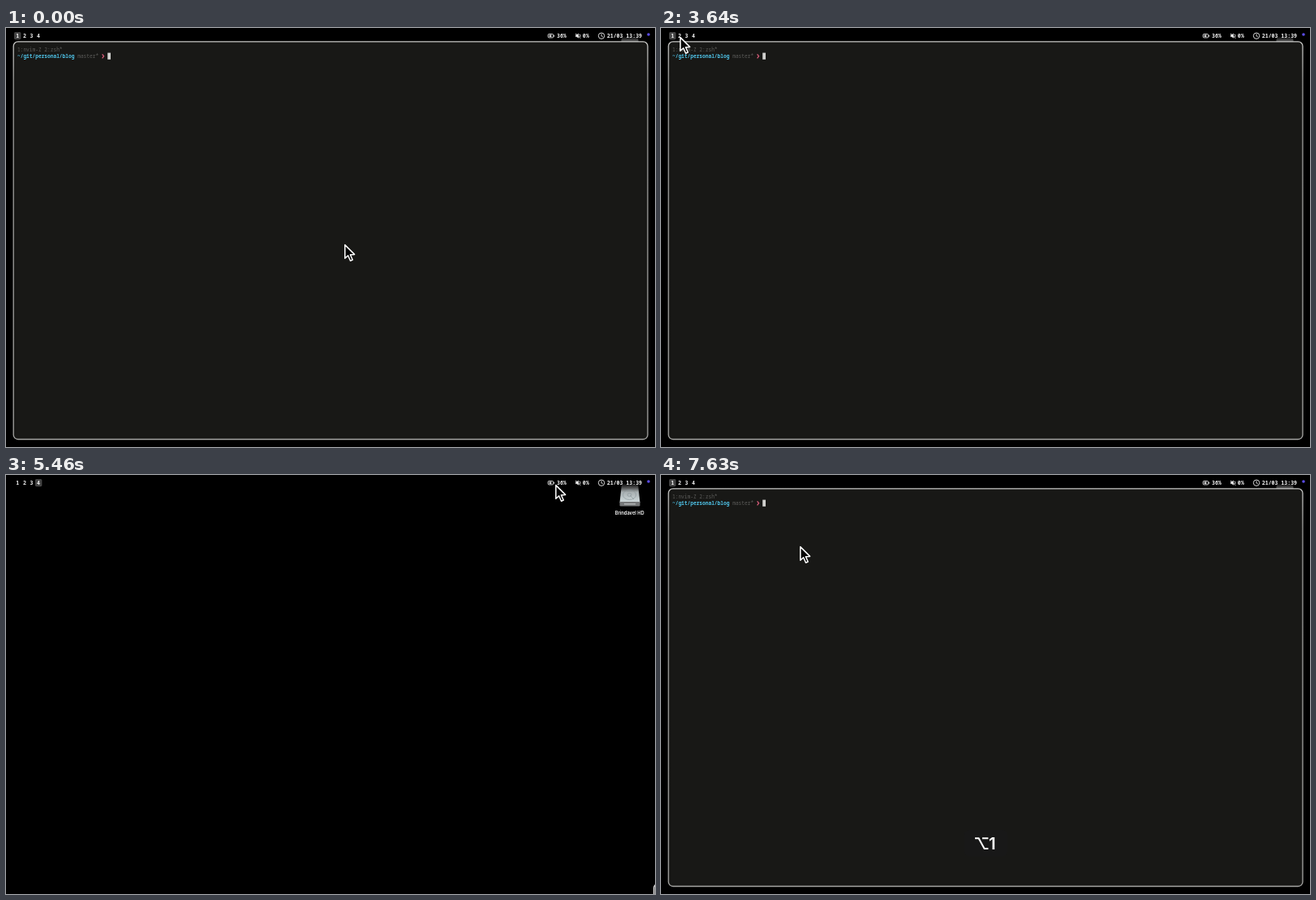
These frames come from a looping animation (800 by 517 pixels, 8000 ms). An HTML page:

```html
<!DOCTYPE html>
<html lang="en">
<head>
<meta charset="utf-8">
<title>Workspace switching</title>
<style>
  html, body { margin: 0; width: 100%; height: 100%; overflow: hidden; background: #000; }
  svg { display: block; width: 800px; height: 517px; }
  text { white-space: pre; }
  .bar { font: 700 6.55px "Noto Sans Mono", "DejaVu Sans Mono", monospace; fill: #f2f2f2; }
  .term { font: 500 6.18px "Noto Sans Mono", "DejaVu Sans Mono", monospace; fill: #5c5c5a; }
  .path { font-weight: 600; fill: #4fc3e8; }
  .label { font: 600 5.75px Inter, sans-serif; fill: #fff; text-anchor: middle; }
  .icon { fill: none; stroke: #eee; stroke-width: .9; }
</style>
</head>
<body>
<svg viewBox="0 0 800 517">
  <defs>
    <linearGradient id="metal" gradientUnits="userSpaceOnUse" x1="0" y1="10" x2="0" y2="35">
      <stop offset="0" stop-color="#000"/>
      <stop offset=".2" stop-color="#444"/>
      <stop offset=".45" stop-color="#a9b0b2"/>
      <stop offset="1" stop-color="#d3dee0"/>
    </linearGradient>
    <linearGradient id="edge" x1="0" y1="0" x2="0" y2="1">
      <stop offset="0" stop-color="#c8c8c6"/>
      <stop offset=".1" stop-color="#9c9c9a"/>
      <stop offset="1" stop-color="#a6a6a4"/>
    </linearGradient>
  </defs>
  <rect width="800" height="517"/>

  <g id="drive">
    <path d="M759 11H779L781.5 34H756.5Z" fill="url(#metal)"/>
    <rect x="756.5" y="33" width="25" height="5.5" rx="1.2" fill="#77797a"/>
    <path d="M762 35.8H776" stroke="#b5b8b9" stroke-width="1.4"/>
    <g fill="none" stroke="#8d999c" stroke-width=".7">
      <ellipse cx="768.5" cy="24.5" rx="8" ry="6"/>
      <ellipse cx="768.5" cy="24.5" rx="2.5" ry="1.9"/>
      <path d="M769 25L774 30"/>
    </g>
    <text class="label" x="768.7" y="48.8">Brindavel HD</text>
  </g>

  <rect id="outline" x="9.5" y="17" width="781.2" height="490.3" rx="5.5" fill="none" stroke="#e6e6e4" stroke-width="1.9"/>
  <rect id="parked" x="798.7" y="504.5" width="40" height="40" rx="5" fill="#181816" stroke="#ddd" stroke-width="1.5"/>

  <g id="terminal">
    <rect x="9.2" y="16.9" width="781.8" height="490.6" rx="5.5" fill="#181816" stroke="url(#edge)" stroke-width="1.3"/>
    <text class="term" x="14" y="28.8">1:nvim-Z 2:zsh*</text>
    <text class="term path" x="14" y="36.9">~/git/personal/blog</text>
    <text class="term" x="88.2" y="36.9">master*</text>
    <path d="M118.6 32.3L120.6 34.8L118.6 37.3" fill="none" stroke="#e0607e" stroke-width="1.2"/>
    <rect x="125.2" y="30.6" width="3.8" height="8.2" fill="#cfcfcd"/>
  </g>

  <rect id="pill" y="5" width="8.4" height="9.2" rx="1.6" fill="#444"/>
  <g class="bar">
    <text x="12.2" y="12">1</text>
    <text x="20.9" y="12">2</text>
    <text x="29.4" y="12">3</text>
    <text x="38.1" y="12">4</text>
    <text x="679" y="12">36%</text>
    <text x="710.8" y="12">0%</text>
    <text x="740.8" y="12">21/03 13:39</text>
  </g>
  <g class="icon">
    <rect x="668.2" y="7.5" width="6.4" height="4.4" rx="1"/>
    <path d="M669.6 9.7H672.4" stroke-width="2.2"/>
    <path d="M675.8 8.7V10.7"/>
    <path d="M702.3 8.6H703.6L705.6 7V12.3L703.6 10.8H702.3Z" fill="#eee" stroke-width=".5"/>
    <path d="M702 6.8L708.4 12.8M707 7.6Q708.6 9.6 707.6 11"/>
    <circle cx="734" cy="9.7" r="3.7"/>
    <path d="M734 7.4V9.9L735.7 10.8"/>
  </g>
  <circle cx="792" cy="8" r="1.8" fill="#5a4be6"/>

  <g id="keys">
    <rect x="374" y="438" width="53" height="32.5" rx="6" fill="#181818"/>
    <path d="M387 448.2H391.6L398.6 461H403.4M396 448.2H403.4" fill="none" stroke="#fff" stroke-width="2"/>
    <text x="404" y="461.9" font-family="Inter, sans-serif" font-size="20.5" font-weight="600" fill="#fff">1</text>
  </g>

  <circle id="ring" cy="11.5" r="13" fill="none" stroke="#245cb0" stroke-width="1.2"/>
  <path id="pointer" d="M.8 1.6V18.2L4.6 14.7L7.5 21.2L10.2 20L7.4 13.7L12.6 13.4Z" fill="#050505" stroke="#fff" stroke-width="1.5" stroke-linejoin="round"/>
</svg>
<script>
const LOOP = 8000, STEP = 70;
const $ = id => document.getElementById(id);
const show = (id, on) => $(id).setAttribute("visibility", on ? "visible" : "hidden");

// Pointer stops: time, x, y
const stops = [
  [350, 417, 266], [1120, 125, 86], [1960, 98, 58], [2310, 51, 21], [2590, 30, 13],
  [2800, 30, 13], [3570, 23, 10], [4060, 23, 10], [4270, 32, 10], [4550, 32, 10],
  [4690, 40, 10], [5040, 40, 10], [5250, 132, 12], [5320, 132, 12], [5460, 677, 11],
  [5600, 768, 11], [5740, 768, 11], [6930, 172, 87], [7070, 171, 87]
];
// Clicks on the workspace numbers: time, x
const clicks = [[3850, 23], [4340, 31.5], [4760, 40]];
const SWITCH_DELAY = 140, HIDE = 3920, KEY_PRESS = 7280, RETURN = 7420;

function pointerAt(t) {
  const i = stops.findIndex(s => s[0] > t);
  if (i === 0) return stops[0].slice(1);
  if (i < 0) return stops.at(-1).slice(1);
  const [t0, x0, y0] = stops[i - 1], [t1, x1, y1] = stops[i];
  const p = (t - t0) / (t1 - t0), e = p * p * (3 - 2 * p);
  return [x0 + (x1 - x0) * e, y0 + (y1 - y0) * e];
}

function draw(t) {
  const [x, y] = pointerAt(t);
  $("pointer").setAttribute("transform", `translate(${x} ${y})`);

  const switched = clicks.filter(c => t >= c[0] + SWITCH_DELAY).length;
  const workspace = t >= RETURN ? 0 : switched;
  $("pill").setAttribute("x", 10 + workspace * 8.65);

  const home = t < HIDE || t >= RETURN;
  show("terminal", home);
  show("outline", !home && workspace === 0);
  show("parked", workspace > 0);
  show("keys", t >= KEY_PRESS);

  const click = clicks.find(c => t >= c[0] && t < c[0] + 210);
  show("ring", click);
  if (click) {
    $("ring").setAttribute("cx", click[1]);
    $("ring").setAttribute("opacity", 1 - (t - click[0]) / 210);
  }
}

function tick(now) {
  const t = now % LOOP;
  draw(Math.floor(t / STEP + 1e-6) * STEP);
  requestAnimationFrame(tick);
}
draw(0);
requestAnimationFrame(tick);
</script>
</body>
</html>
```
